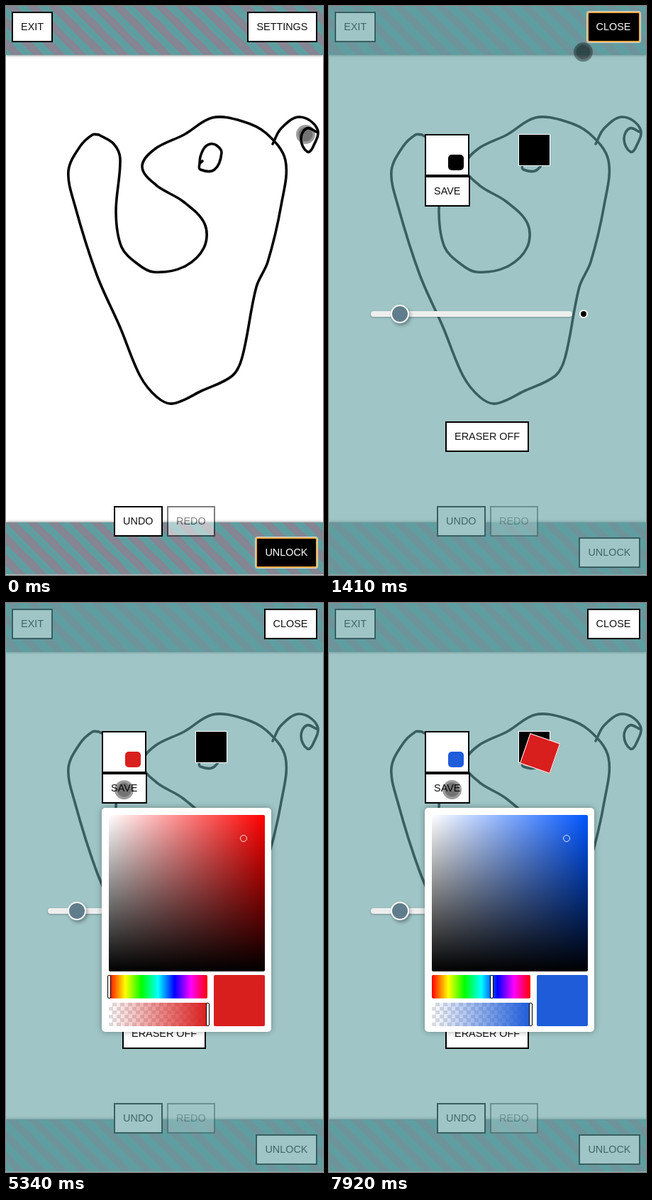
Animation, 447 px wide and 800 px high, one loop 8 s. Source, as an HTML page:

```html
<!DOCTYPE html>
<html lang="en">
<head>
<meta charset="utf-8">
<title>Drawing pad</title>
<style>
html, body { margin: 0; width: 100%; height: 100%; overflow: hidden; background: #fff; }
#stage { position: relative; width: 447px; height: 800px; overflow: hidden; }
#stage div, #stage svg { position: absolute; box-sizing: border-box; }
.bar {
  left: 0; width: 447px; box-shadow: 0 0 4px #0009;
  background: linear-gradient(45deg, #858593 25%, #5f9ea0 25% 50%, #858593 50% 75%, #5f9ea0 75%) 0 0/30px 30px;
}
#stage .btn {
  height: 43px; padding: 0 11.1px; border: 2px solid #000; background: #fff; color: #111;
  font: 14.4px/39px "Liberation Sans", Arial, sans-serif; white-space: nowrap;
}
#stage .on { background: #000; color: #fff; }
#stage .ring { border-color: #f2ad48; border-radius: 3px; box-shadow: 0 0 0 1px #fffa; }
#ink { left: 0; top: 0; fill: none; stroke: #000; stroke-width: 3.6; stroke-linecap: round; stroke-linejoin: round; }
#panel { left: 0; top: 0; width: 447px; height: 800px; background: #5f9ea099; }
#swatch { left: 135px; top: 180px; width: 63px; height: 59px; border: 2px solid #000; background: #fff; }
#chip { left: 31px; top: 27px; width: 22px; height: 22px; border-radius: 5px; }
.saved { left: 267px; top: 180px; width: 45px; height: 45px; border: 1px solid #fff; background: #000; }
#stage #red { left: 274.5px; top: 189px; background: #d91e1e; }
#track { left: 59px; top: 429px; width: 284px; height: 8px; border-radius: 4px; background: #eee; box-shadow: 0 1px 3px #0004; }
#thumb { left: 87px; top: 420px; width: 26px; height: 26px; border-radius: 50%; border: 2px solid #fff; background: #607d8b; box-shadow: 2px 3px 5px #0005; }
#dot { left: 353px; top: 427px; width: 12px; height: 12px; border-radius: 50%; border: 2px solid #fff; background: #000; }
#picker { left: 135px; top: 288px; width: 239px; height: 315px; border-radius: 5px; background: #fff; box-shadow: 0 0 8px #0005; }
#picker div { border-radius: 2px; }
#sv { left: 10px; top: 10px; width: 220px; height: 220px; }
#stage #mark { width: 10px; height: 10px; margin: -5px; border: 1px solid #fffd; border-radius: 50%; }
#hue, #alpha { left: 10px; width: 139px; height: 33px; }
#hue { top: 235px; background: linear-gradient(90deg, red, #ff0, lime, cyan, blue, #f0f, red); }
#alpha { top: 274px; }
#sample { left: 158px; top: 235px; width: 72px; height: 72px; }
.grip { top: 0; width: 5px; height: 33px; margin-left: -2.5px; border: 1px solid #000; background: #fff; }
#touch {
  left: -13.5px; top: -13.5px; width: 27px; height: 27px; border-radius: 50%;
  background: radial-gradient(circle, #0000008c 9px, #00000062 11px);
}
</style>
</head>
<body>
<div id="stage">
  <svg id="ink" width="447" height="800"></svg>
  <div class="bar" style="top:0;height:69px"></div>
  <div class="bar" style="top:726px;height:73px"></div>
  <div class="btn" style="left:8px;top:8px">EXIT</div>
  <div class="btn" id="settings" style="right:8.5px;top:8px">SETTINGS</div>
  <div class="btn" style="left:152px;top:703px">UNDO</div>
  <div class="btn" style="left:227px;top:703px;opacity:.5">REDO</div>
  <div class="btn" id="unlock" style="right:8.5px;top:747px">UNLOCK</div>
  <div id="panel">
    <div id="swatch"><div id="chip"></div></div>
    <div class="btn" id="save" style="left:135px;top:239px">SAVE</div>
    <div class="saved"></div>
    <div class="saved" id="red"></div>
    <div id="track"></div><div id="thumb"></div><div id="dot"></div>
    <div class="btn" style="left:164px;top:584px">ERASER OFF</div>
    <div id="picker">
      <div id="sv"><div id="mark"></div></div>
      <div id="hue"><div class="grip" id="hueGrip"></div></div>
      <div id="alpha"><div class="grip" style="left:139px"></div></div>
      <div id="sample"></div>
    </div>
  </div>
  <div class="btn" id="close" style="right:8.5px;top:8px">CLOSE</div>
  <div id="touch"></div>
</div>
<script>
const LOOP = 8000, OPEN = 1198, PICKER = 3130, DRAG = 3780, SAVE = 5430, BLUE = 6920;
const $ = id => document.getElementById(id);
const clamp = v => Math.max(0, Math.min(1, v));
const ease = u => u * u * (3 - 2 * u);
const show = (id, on) => $(id).style.visibility = on ? "visible" : "hidden";

// Key points of the body, the eye and the tail
const strokes = [
  `131,181 152,194 161,215 155,290 163,339 186,363 208,374 250,367 279,340 280,306 250,275 212,252
   192,226 210,201 251,181 291,157 333,162 367,179 394,217 388,280 369,360 353,395 333,494 319,520
   276,541 235,559 213,550 189,520 161,452 128,378 97,280 88,232 104,198 122,181 131,181`,
  "277,218 273,222 274,230 294,230 304,206 297,196 288,194 280,199 274,212 273,222",
  "376,194 388,172 414,156 439,173 433,198 425,205 416,187 424,172 438,177"
];

// Smooth curve through all points (Catmull-Rom as cubic Beziers)
function curve(text) {
  const p = text.split(/\s+/).map(s => s.split(",").map(Number));
  let d = "M" + p[0];
  for (let i = 0; i < p.length - 1; i++) {
    const a = p[i - 1] || p[i], b = p[i], c = p[i + 1], e = p[i + 2] || c;
    const reach = Math.hypot(c[0] - b[0], c[1] - b[1]) / 3;
    const side = (q, from, to) => {
      const len = Math.hypot(to[0] - from[0], to[1] - from[1]) || 1;
      return [0, 1].map(k => q[k] + (to[k] - from[k]) / len * reach);
    };
    d += `C${side(b, a, c)} ${side(c, e, b)} ${c}`;
  }
  return d;
}
$("ink").innerHTML = strokes.map(s => `<path d="${curve(s)}"/>`).join("");

// Finger moves: start, end, x, y; it rests in between
const moves = [
  [0, 0, 422, 180], [80, 310, 326, 95], [540, 1020, 395, 28], [1180, 2050, 182, 236],
  [2050, 2270, 171, 208], [2580, 2810, 175, 221], [3060, 3690, 262, 420], [DRAG, 4190, 335, 331],
  [4350, 4700, 262, 561], [4700, 5350, 166, 262], [5560, 5980, 219, 375], [6060, 6300, 231, 559],
  [6460, 6760, 229, 542], [7000, 7770, 173, 262]
];
function finger(t) {
  let x = 0, y = 0;
  for (const [start, end, toX, toY] of moves) {
    if (t < start) break;
    const f = ease(clamp((t - start) / (end - start || 1) + (end === start)));
    x += (toX - x) * f;
    y += (toY - y) * f;
  }
  return [x, y];
}

function hsv(h, s, v) {
  const ch = n => {
    const k = (n + h / 60) % 6;
    return Math.round(255 * v * (1 - s * clamp(Math.min(k, 4 - k))));
  };
  return `rgb(${ch(5)},${ch(3)},${ch(1)})`;
}

function draw(t) {
  const [x, y] = finger(t);
  $("touch").style.transform = `translate(${x}px,${y}px)`;

  const open = t >= OPEN, p = clamp((t - OPEN) / 200);
  show("settings", !open);
  show("close", open);
  $("unlock").className = open ? "btn" : "btn on ring";
  $("panel").style.opacity = p;

  const focus = t < PICKER, k = Math.min(1, (1 - p) / .69), close = $("close");
  close.className = focus ? "btn on ring" : "btn";
  close.style.background = focus ? `rgb(${20 * k},${74 * k},${94 * k})` : "";
  close.style.color = focus ? `rgba(255,255,255,${1 - .3 * k})` : "";

  $("picker").style.display = t >= PICKER ? "block" : "none";
  const [mx, my] = t < DRAG ? [145, 518] : finger(Math.min(t, 4200));
  const h = t < BLUE ? 0 : 220, s = (mx - 145) / 220, v = 1 - (my - 298) / 220;
  const color = hsv(h, s, v);
  $("chip").style.background = $("sample").style.background = color;
  $("sv").style.background = `linear-gradient(#0000,#000), linear-gradient(90deg,#fff,${hsv(h, 1, 1)})`;
  $("alpha").style.background = `linear-gradient(90deg,${color.replace(")", ",0)")},${color}),
    repeating-conic-gradient(#ddd 0 25%,#fff 0 50%) 0 0/11px 11px`;
  $("mark").style.left = mx - 145.5 + "px";
  $("mark").style.top = my - 298.5 + "px";
  $("hueGrip").style.left = h / 360 * 139 + "px";

  $("save").className = t >= SAVE && t < BLUE ? "btn on" : "btn";
  show("red", t >= SAVE);
  $("red").style.transform = `rotate(19deg) scale(${1.4 - .4 * clamp((t - SAVE) / 250)})`;
}

const start = performance.now();
function tick() {
  draw((performance.now() - start) % LOOP);
  requestAnimationFrame(tick);
}
tick();
</script>
</body>
</html>
```
